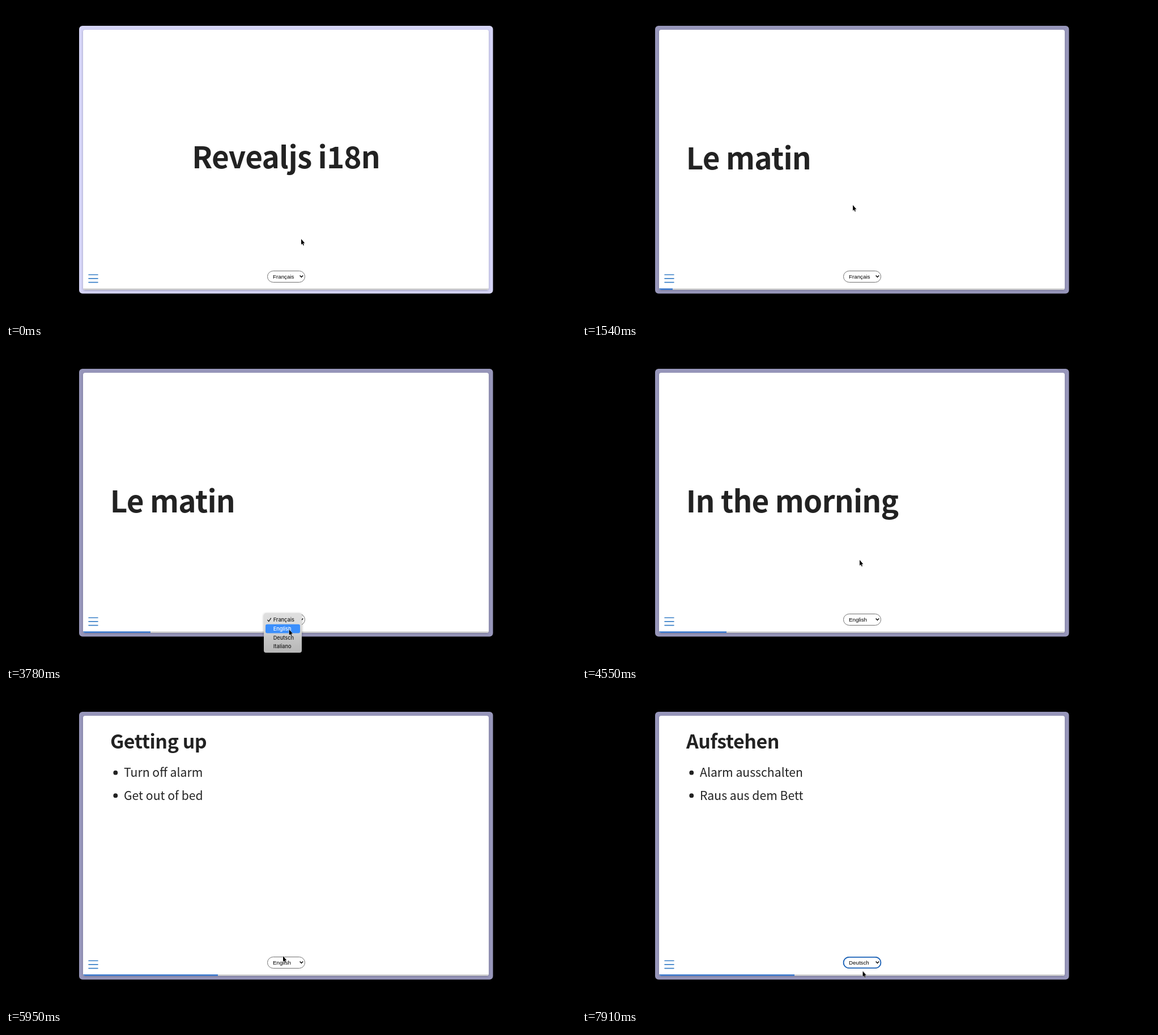
Write an HTML page that moves like this. It is 1006 by 557 pixels and loops after 8000 ms.

```html
<!DOCTYPE html>
<html lang="en">
<head>
<meta charset="utf-8">
<title>Slides with a language menu</title>
<style>
  html, body { margin: 0; width: 100%; height: 100%; overflow: hidden; background: #000; }
  svg { display: block; width: 100%; height: 100%; }

  .slide text { font-family: "Noto Sans CJK SC", "Noto Sans CJK JP", "Noto Sans CJK", "Noto Sans", sans-serif; fill: #222; }
  .slide .h1, .slide .h2 { font-weight: 600; letter-spacing: -.015em; }
  .slide .h1 { font-size: 53px; }
  .slide .h2 { font-size: 34px; }
  .slide .li { font-size: 21.2px; }
  .label { font: 9.75px "Liberation Sans", Arial, sans-serif; }
  .menu { font: 500 9.2px Inter, sans-serif; color: #1c1c1c; fill: currentColor; }
  .hl { color: #fff; fill: currentColor; }
  #tick { fill: none; stroke: currentColor; stroke-width: 1.3; stroke-linecap: round; stroke-linejoin: round; }

  /* one loop is 8 s, so 1% is 80 ms */
  .a { animation: 8s step-end infinite; }
  .ease { animation-timing-function: ease-in-out; }

  #frame { animation-name: dim; }
  #title { animation-name: title; }
  #matin { animation-name: matin; }
  #morning { animation-name: morning; }
  #up { animation-name: up; }
  #auf { animation-name: auf; }
  #labelFr { animation-name: fr; }
  #labelEn { animation-name: en; }
  #labelDe { animation-name: auf; }
  #ring { animation-name: ring; }
  #menu1 { animation-name: menu1; }
  #menu2 { animation-name: menu2; }
  #hlFr { animation-name: hlFr; }
  #hlEn1 { animation-name: hlEn1; }
  #hlEn2 { animation-name: hlEn2; }
  #hlDe { animation-name: hlDe; }
  #bar { animation-name: bar; transform-box: fill-box; transform-origin: 0 0; }
  #cursor { animation-name: cursor; }

  @keyframes dim { 0% { fill: #d5d4f6; } 7%, 100% { fill: #9796ba; } }

  @keyframes title { 0% { opacity: 1; } 19.25%, 100% { opacity: 0; } }
  @keyframes matin { 0% { opacity: 0; } 19.25% { opacity: 1; } 48.125%, 100% { opacity: 0; } }
  @keyframes morning { 0% { opacity: 0; } 48.125% { opacity: 1; } 65.625%, 100% { opacity: 0; } }
  @keyframes up { 0% { opacity: 0; } 65.625% { opacity: 1; } 97.125%, 100% { opacity: 0; } }
  @keyframes auf { 0% { opacity: 0; } 97.125%, 100% { opacity: 1; } }

  @keyframes fr { 0% { opacity: 1; } 48.125%, 100% { opacity: 0; } }
  @keyframes en { 0% { opacity: 0; } 48.125% { opacity: 1; } 97.125%, 100% { opacity: 0; } }
  @keyframes ring { 0% { opacity: 0; } 48.125% { opacity: 1; } 56.875% { opacity: 0; } 97.125%, 100% { opacity: 1; } }

  @keyframes menu1 {
    0% { opacity: 0; }
    34.125% { opacity: 1; }
    47.25% { opacity: 1; animation-timing-function: linear; }
    49.875%, 100% { opacity: 0; }
  }
  @keyframes menu2 {
    0% { opacity: 0; }
    78.75% { opacity: 1; }
    96.25% { opacity: 1; animation-timing-function: linear; }
    98.875%, 100% { opacity: 0; }
  }
  @keyframes hlFr { 0% { opacity: 1; } 39.375%, 100% { opacity: 0; } }
  @keyframes hlEn1 { 0% { opacity: 0; } 39.375% { opacity: 1; } 45.5% { opacity: 0; } 46.375%, 100% { opacity: 1; } }
  @keyframes hlEn2 { 0% { opacity: 1; } 84.875%, 100% { opacity: 0; } }
  @keyframes hlDe { 0% { opacity: 0; } 84.875% { opacity: 1; } 94.5% { opacity: 0; } 95.375%, 100% { opacity: 1; } }

  @keyframes bar {
    0% { transform: scaleX(0); }
    19.25% { transform: scaleX(.0335); animation-timing-function: cubic-bezier(.2, .75, .44, .985); }
    28.65% { transform: scaleX(.16667); }
    65.625% { transform: scaleX(.2); animation-timing-function: cubic-bezier(.2, .75, .44, .985); }
    75.1%, 100% { transform: scaleX(.33333); }
  }

  @keyframes cursor {
    0% { transform: translate(521px, 412px); }
    9.625%, 21% { transform: translate(478px, 352px); }
    28.875% { transform: translate(500px, 478px); }
    29.75%, 37.625% { transform: translate(502px, 481px); }
    41.125%, 45.5% { transform: translate(500px, 497px); }
    49.875%, 51.625% { transform: translate(499px, 494px); }
    56%, 68.25% { transform: translate(490px, 373px); }
    74.375% { transform: translate(489px, 467px); }
    77.875%, 81.375% { transform: translate(491px, 478px); }
    86.625%, 100% { transform: translate(495.5px, 493.5px); }
  }
</style>
</head>
<body>
<svg viewBox="0 0 1006 557">
  <defs>
    <clipPath id="page"><rect x="136" y="42" width="716" height="460" rx="4"/></clipPath>
    <linearGradient id="glass" gradientUnits="userSpaceOnUse" x1="0" y1="451" x2="0" y2="537">
      <stop offset="0" stop-color="#e2e2e2"/>
      <stop offset=".48" stop-color="#dadada"/>
      <stop offset=".72" stop-color="#c6c6c6"/>
      <stop offset="1" stop-color="#b9b9b9"/>
    </linearGradient>
    <filter id="soft" x="-20%" y="-20%" width="140%" height="140%">
      <feDropShadow dx="0" dy="1" stdDeviation="2" flood-opacity=".3"/>
    </filter>
    <filter id="edge" x="-5%" y="-5%" width="110%" height="110%">
      <feDropShadow dx="0" dy="1" stdDeviation="1.5" flood-color="#446" flood-opacity=".45"/>
    </filter>
    <path id="tick" d="M461.8 479.3l2 2.4 3.7-5.6"/>
    <rect id="pill" x="458" y="471" width="61" height="15.7" rx="3" fill="#3b8ffc"/>
    <g id="items">
      <text x="471.7" y="482.3">Français</text>
      <text x="471.7" y="498">English</text>
      <text x="471.7" y="513.7">Deutsch</text>
      <text x="471.7" y="529.4">Italiano</text>
    </g>
  </defs>

  <rect id="frame" class="a ease" x="129" y="35" width="730.5" height="473.5" rx="6"/>
  <rect x="136" y="42" width="716" height="460" rx="4" fill="#fff" filter="url(#edge)"/>
  <g clip-path="url(#page)">
    <rect x="136" y="499.5" width="716" height="2.5" fill="#ccc"/>
    <rect id="bar" class="a" x="136" y="499.5" width="716" height="2.3" fill="#2a70cf"/>
  </g>

  <g class="slide">
    <text id="title" class="a h1" x="494.2" y="287" text-anchor="middle">Revealjs i18n</text>
    <text id="matin" class="a h1" x="183.8" y="289">Le matin</text>
    <text id="morning" class="a h1" x="183.8" y="289">In the morning</text>
    <g id="up" class="a">
      <text class="h2" x="184" y="100">Getting up</text>
      <text class="li" x="208" y="150">Turn off alarm</text>
      <text class="li" x="208" y="191">Get out of bed</text>
      <circle cx="193.3" cy="142.7" r="3.9" fill="#222"/>
      <circle cx="193.3" cy="183.2" r="3.9" fill="#222"/>
    </g>
    <g id="auf" class="a">
      <text class="h2" x="184" y="100">Aufstehen</text>
      <text class="li" x="208" y="150">Alarm ausschalten</text>
      <text class="li" x="208" y="191">Raus aus dem Bett</text>
      <circle cx="193.3" cy="142.7" r="3.9" fill="#222"/>
      <circle cx="193.3" cy="183.2" r="3.9" fill="#222"/>
    </g>
  </g>

  <path d="M146 475.2h16M146 481.9h16M146 488.6h16" stroke="#3a80c8" stroke-width="1.6" stroke-linecap="round"/>

  <rect x="461.5" y="468.5" width="66" height="20" rx="10" fill="#fff" stroke="#707070"/>
  <rect id="ring" class="a" x="461.6" y="468.8" width="65.8" height="19.4" rx="9.7" fill="#fff" stroke="#1a62b8" stroke-width="1.8"/>
  <g class="label">
    <text id="labelFr" class="a" x="471" y="481.7">Français</text>
    <text id="labelEn" class="a" x="471" y="481.7">English</text>
    <text id="labelDe" class="a" x="471" y="481.7">Deutsch</text>
  </g>
  <path d="M518.6 476.6l2.8 2.9 2.8-2.9" fill="none" stroke="#000" stroke-width="1.4"/>

  <g id="menu1" class="a menu">
    <rect x="455" y="467" width="67" height="70" rx="4" fill="url(#glass)" filter="url(#soft)"/>
    <use href="#items"/>
    <use href="#tick"/>
    <g id="hlFr" class="a hl">
      <use href="#pill"/>
      <use href="#tick"/>
      <text x="471.7" y="482.3">Français</text>
    </g>
    <g id="hlEn1" class="a hl">
      <use href="#pill" y="15.7"/>
      <text x="471.7" y="498">English</text>
    </g>
  </g>

  <g id="menu2" class="a menu">
    <rect x="455" y="451.3" width="67" height="70" rx="4" fill="url(#glass)" filter="url(#soft)"/>
    <use href="#items" y="-15.7"/>
    <use href="#tick"/>
    <g id="hlEn2" class="a hl">
      <use href="#pill"/>
      <use href="#tick"/>
      <text x="471.7" y="482.3">English</text>
    </g>
    <g id="hlDe" class="a hl">
      <use href="#pill" y="15.7"/>
      <text x="471.7" y="498">Deutsch</text>
    </g>
  </g>

  <g id="cursor" class="a ease">
    <path d="M0 0V10L2.1 8 3.6 11.5 5 10.9 3.6 7.5H6.4Z" stroke="#fff" stroke-width="1" paint-order="stroke" stroke-linejoin="round"/>
  </g>
</svg>
</body>
</html>
```
